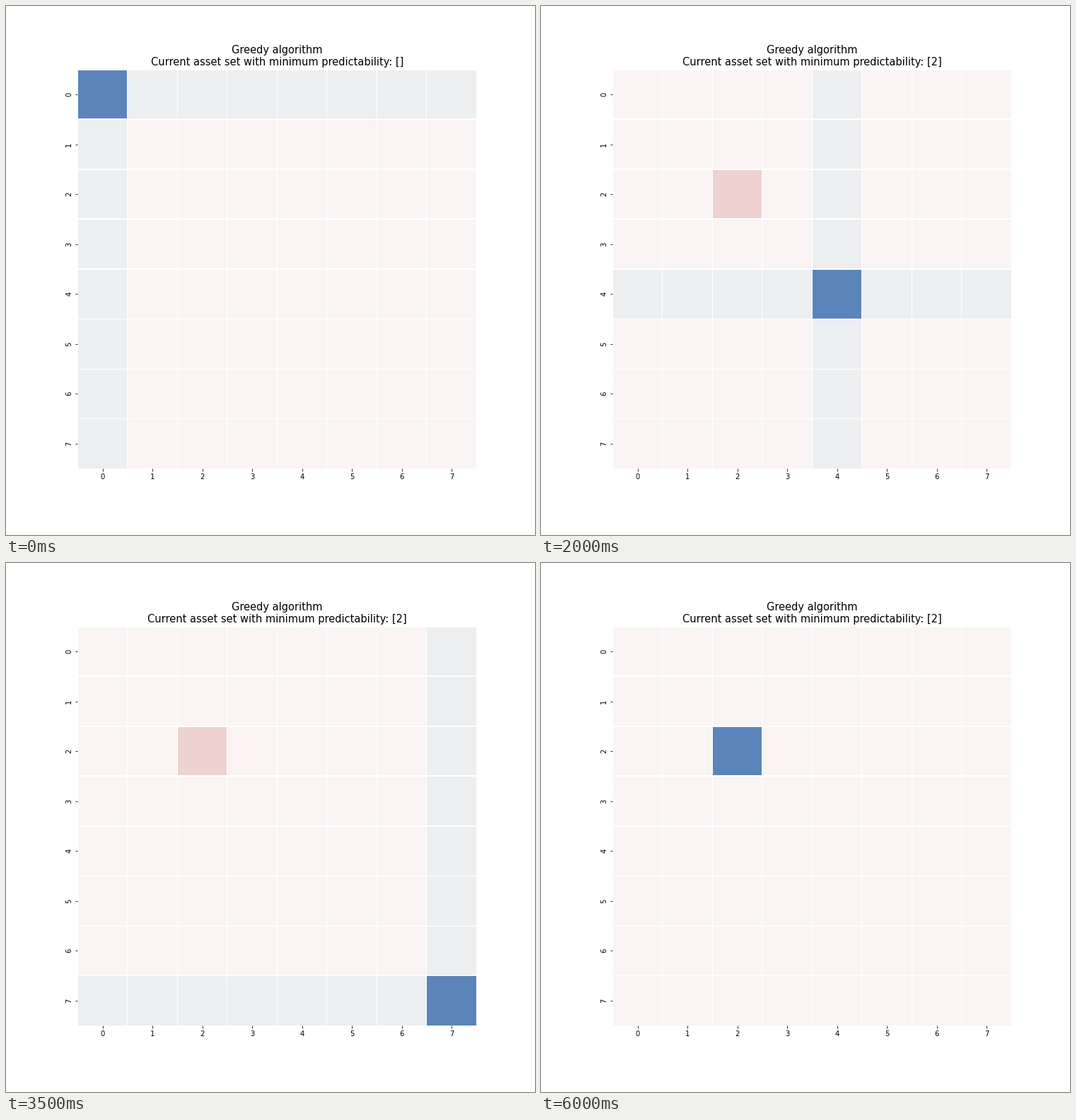
A matplotlib script that plays this animation: 748 px wide and 748 px high, repeating every 8 s.

```python
import matplotlib.pyplot as plt
from matplotlib.animation import FuncAnimation
from matplotlib.patches import Rectangle

SIZE, DPI = 748, 72
N = 8
LEFT, TOP, PITCH = 101.3, 90.0, 70.5
RIGHT, BOTTOM = LEFT + N * PITCH, TOP + N * PITCH
BEST = 2
FRAMES, STEP_MS = 16, 500

PLAIN, CROSS = "#faf5f4", "#edeef0"
CHOSEN, ACTIVE = "#edd2d1", "#5b84bb"

plt.rcParams["font.family"] = "DejaVu Sans"
fig = plt.figure(figsize=(SIZE / DPI, SIZE / DPI), dpi=DPI, facecolor="white")
ax = fig.add_axes([LEFT / SIZE, 1 - BOTTOM / SIZE,
                   N * PITCH / SIZE, N * PITCH / SIZE])
ax.set_xlim(LEFT, RIGHT)
ax.set_ylim(BOTTOM, TOP)
ax.spines[:].set_visible(False)

labels = [str(i) for i in range(N)]
ax.set_xticks([LEFT + (i + 0.5) * PITCH for i in range(N)], labels)
ax.set_yticks([TOP + (i + 0.5) * PITCH for i in range(N)], labels,
              rotation=90, va="center")
ax.tick_params(labelsize=10, length=3.5, width=0.8, pad=3.5)
title = ax.set_title("", fontsize=14.67, pad=6)


def span(first, i, gap):
    """Whole-pixel start and end of cell i, leaving a white gap after it."""
    start = first + int(i * PITCH + 0.01)
    following = first + int((i + 1) * PITCH + 0.01)
    return start, following - gap


def make_cell(row, col):
    x0, x1 = span(102, col, 1)
    y0, y1 = span(91, row, 2 if row < 4 else 1)
    if col % 2:
        x1 = min(x1, 665)
    return ax.add_patch(Rectangle((x0, y0), x1 - x0, y1 - y0, lw=0,
                                  antialiased=False, facecolor=PLAIN))


cells = {(r, c): make_cell(r, c) for r in range(N) for c in range(N)}


def cell_color(row, col, step):
    if step >= N:
        # the winner blinks, then stays lit
        lit = step >= 12 or step % 2 == 0
        return ACTIVE if lit and row == col == BEST else PLAIN
    if row == col == step:
        return ACTIVE
    if step in (row, col):
        return CROSS
    if row == col == BEST and step > BEST:
        return CHOSEN
    return PLAIN


def update(step):
    found = [BEST] if step > BEST else []
    title.set_text("Greedy algorithm\n"
                   f"Current asset set with minimum predictability: {found}")
    for (row, col), cell in cells.items():
        cell.set_facecolor(cell_color(row, col, step))
    return [title, *cells.values()]


anim = FuncAnimation(fig, update, frames=FRAMES, interval=STEP_MS,
                     init_func=lambda: update(0), repeat=True,
                     repeat_delay=0, blit=False)
plt.show()
```
